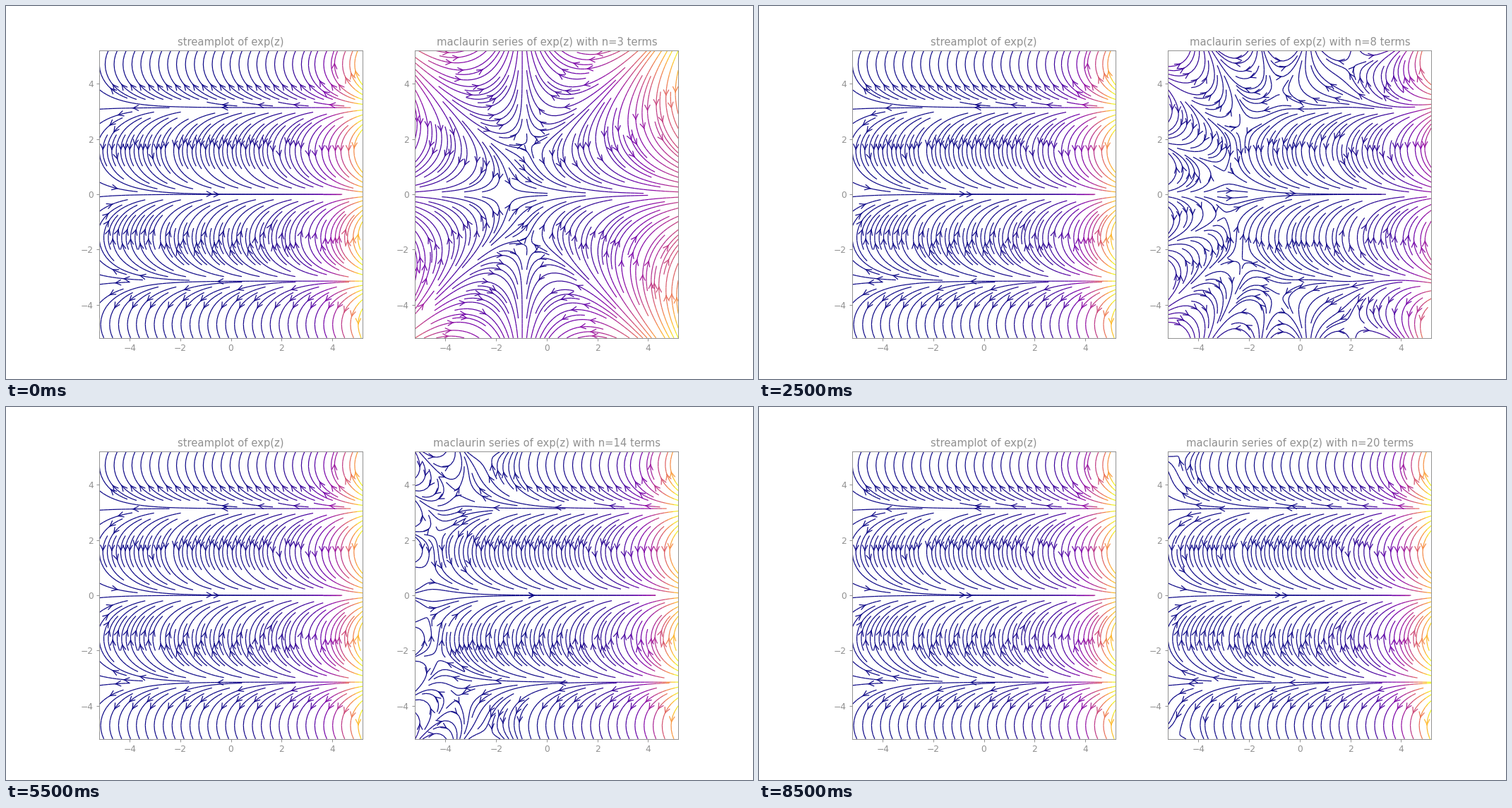
These frames come from a looping animation (1058 by 529 pixels, 9000 ms). A matplotlib script:

```python
import numpy as np
import matplotlib.pyplot as plt
from matplotlib.animation import FuncAnimation

WIDTH, HEIGHT = 1058, 529
DPI = WIDTH / 12
LIMIT = 5.2
FIRST_TERMS, LAST_TERMS = 3, 20
GRAY = "#909090"

axis = np.linspace(-LIMIT, LIMIT, 105)
x, y = np.meshgrid(axis, axis)
z = x + 1j * y


def maclaurin(z, n):
    """Sum of z**k / k! for k = 0..n."""
    term = np.ones_like(z)
    total = term.copy()
    for k in range(1, n + 1):
        term = term * z / k
        total += term
    return total


def draw_field(ax, w):
    """Streamplot of the conjugate field; returns the artists it added."""
    before = set(ax.get_children())
    ax.streamplot(x, y, w.real, -w.imag, color=np.abs(w), cmap="plasma",
                  density=2, linewidth=1, arrowstyle="->", arrowsize=1.5)
    ax.set(xlim=(-LIMIT, LIMIT), ylim=(-LIMIT, LIMIT))
    return [a for a in ax.get_children() if a not in before]


def style(ax):
    ax.tick_params(colors=GRAY)
    for spine in ax.spines.values():
        spine.set_color(GRAY)


plt.rcParams["font.family"] = "DejaVu Sans"
fig, (left, right) = plt.subplots(1, 2, figsize=(12, HEIGHT / DPI), dpi=DPI)
for ax in (left, right):
    style(ax)

left.set_title("streamplot of exp(z)", color=GRAY)
draw_field(left, np.exp(z))

fields = {}


def update(frame):
    n = FIRST_TERMS + frame
    if n not in fields:
        fields[n] = draw_field(right, maclaurin(z, n))
    for terms, artists in fields.items():
        for artist in artists:
            artist.set_visible(terms == n)
    right.set_title(f"maclaurin series of exp(z) with n={n} terms", color=GRAY)


anim = FuncAnimation(fig, update, frames=LAST_TERMS - FIRST_TERMS + 1,
                     init_func=lambda: [], interval=500, repeat=True,
                     repeat_delay=0)
plt.show()
```
